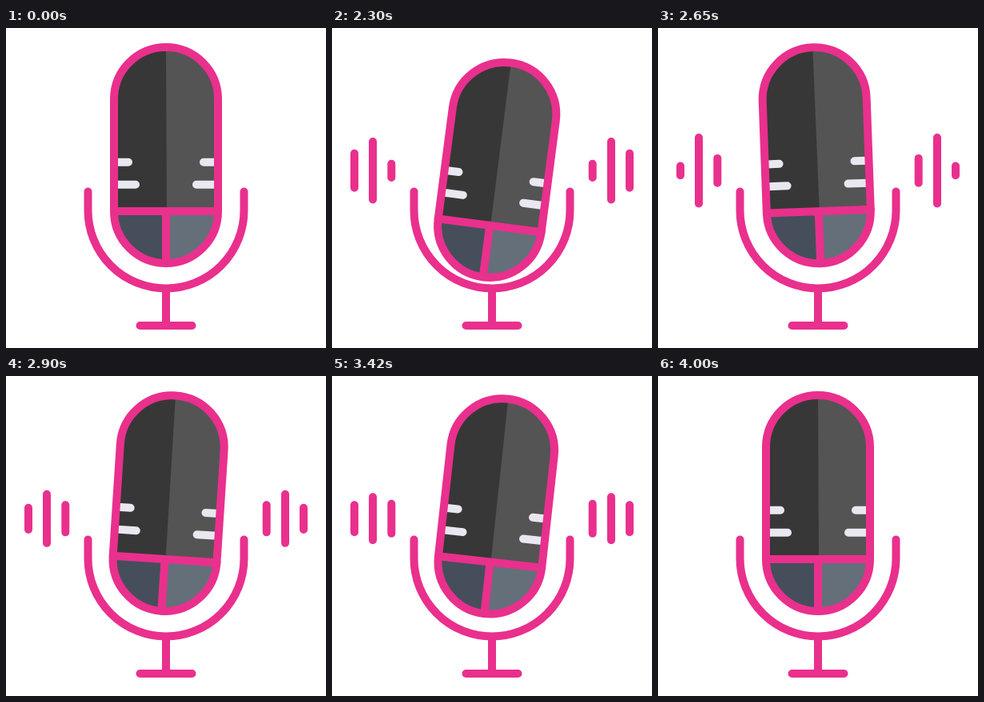
Write an HTML page that moves like this. It is 400 by 400 pixels and loops after 4020 ms.

```html
<!DOCTYPE html>
<html lang="en">
<head>
<meta charset="utf-8">
<title>Microphone</title>
<style>
  html, body { margin: 0; width: 100%; height: 100%; overflow: hidden; background: #fff; }
  svg { display: block; width: 100%; height: 100%; }
  .line { fill: none; stroke: #e9308d; stroke-width: 10; stroke-linecap: round; }
</style>
</head>
<body>
<svg viewBox="0 0 400 400">
  <clipPath id="capsule"><rect x="135" y="24" width="130" height="270" rx="65"/></clipPath>
  <path id="waves" class="line"/>
  <path class="line" d="M102.5 204.5V228a97.5 97.5 0 0 0 195 0V204.5M200 326V372M167.500 372H232.500"/>
  <g id="mic">
    <g clip-path="url(#capsule)">
      <path fill="#545454" d="M130 19H270V229H130Z"/>
      <path fill="#373737" d="M130 19H200L201 229H130Z"/>
      <path fill="#656f79" d="M130 229H270V299H130Z"/>
      <path fill="#464e5b" d="M130 229H200V299H130Z"/>
      <path class="line" style="stroke:#e9e7ef" d="M137 167.800H153M137 195.700H162M263 167.800H247M263 195.700H238"/>
    </g>
    <rect class="line" x="135" y="24" width="130" height="270" rx="65"/>
    <path class="line" d="M135 229H265M200 229V294"/>
  </g>
</svg>
<script>
const LOOP = 4020, START = 2000, SHOW = 2020, END = 4000;
const LENGTH = END - START;
const WAVE_Y = 178.3;
const mic = document.getElementById('mic');
const waves = document.getElementById('waves');

// Each bar swings around its mean length; peak is a time of greatest length.
const bars = [
  { x: 28, mean: 25, swing: 18, period: 217, peak: 300 },
  { x: 51, mean: 80, swing: 26, period: 180.5, peak: 1150 },
  { x: 74.3, mean: 25, swing: 13, period: 238, peak: 1169 }
];

const wave = (t, period, peak = 0) => Math.cos(2 * Math.PI * (t - peak) / period);
const rise = t => Math.min(1, t / 130);
const fade = (t, span) => Math.min(1, (LENGTH - t) / span);

function tilt(t) {
  const period = 284, w = wave(t, period);
  // The first half swing starts upright, the others go from side to side.
  return 8 * (t < period / 2 ? (w - 1) / 2 : w) * fade(t, 730);
}

const bounce = t => 9 * (1 + wave(t, 240, 300)) * rise(t) * fade(t, 760);

function barPath({ x, mean, swing, period, peak }, t) {
  const len = (mean + swing * wave(t, period, peak)) * rise(t) * fade(t, 280);
  return [x, 400 - x].map(px => `M${px} ${WAVE_Y - len / 2}v${len}`).join('');
}

function draw(now) {
  const time = now % LOOP;
  const active = time >= SHOW && time < END;
  const t = active ? time - START : 0;
  mic.setAttribute('transform', `translate(0 ${bounce(t)}) rotate(${tilt(t)} 200 207)`);
  waves.setAttribute('d', active ? bars.map(bar => barPath(bar, t)).join('') : '');
}

const origin = performance.now();
function tick() {
  draw(performance.now() - origin);
  requestAnimationFrame(tick);
}
tick();
</script>
</body>
</html>
```
